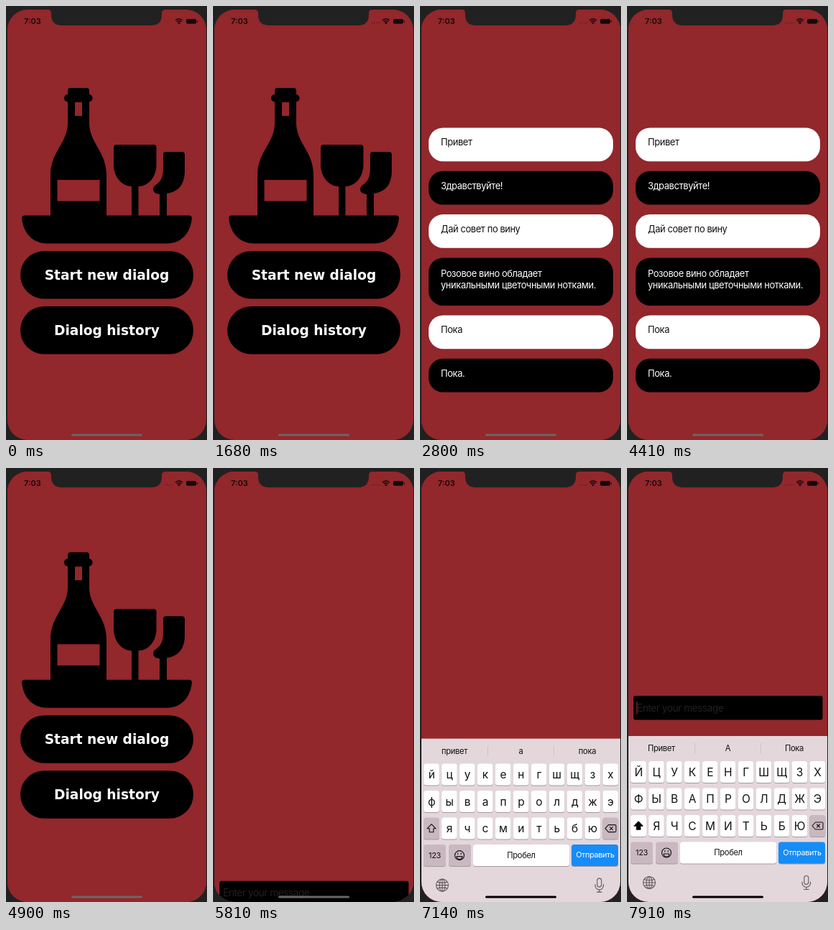
Recreate the animation shown at these times as an HTML page. Size 280 px wide and 604 px high, loop 8000 ms.

```html
<!DOCTYPE html>
<html lang="ru">
<head>
<meta charset="utf-8">
<style>
  html, body { margin: 0; width: 100%; height: 100%; overflow: hidden; background: #212122; }
  svg { display: block; width: 280px; height: 604px; }
  text { font-family: Inter, Roboto, sans-serif; letter-spacing: -.03em; }
  .button { font: bold 18.6px "DejaVu Sans", sans-serif; letter-spacing: 0; fill: #fff; }
  .mid { text-anchor: middle; }
  .red { fill: #92272c; }
  .icon { fill: none; stroke: #111; stroke-width: 1.1; stroke-linejoin: round; stroke-linecap: round; }
  .soft { stroke: #62575d; }
</style>
</head>
<body>
<svg viewBox="0 0 280 604">
  <defs>
    <clipPath id="screenShape"><rect x="2" y="5" width="277" height="599" rx="28"/></clipPath>
    <g id="home">
      <rect class="red" width="280" height="604"/>
      <rect x="86" y="114" width="30" height="20" rx="4"/>
      <rect x="81" y="123" width="39.5" height="10.5" rx="5"/>
      <path d="M86 130V163C86 190 62 203 62 235V293H140V235C140 203 116 190 116 163V130Z"/>
      <path class="red" d="M96 134h10v19h-10zM71.5 242h59v29.5h-59z"/>
      <path d="M154 193H206Q209.5 193 209.5 197V221C209.5 238 198 251 184.500 251V293H175V251C162 251 150 238 150 221V197Q150 193 154 193Z"/>
      <path d="M223 203H245Q249 203 249 207V230C249 248 240 259 224 261V293H214V262Q205 261 205 255Q205 251 210 248C217 243 219 236 219 224V207Q219 203 223 203Z"/>
      <path d="M26 291.5H255Q259 291.5 259 295C257 317 243 330.5 225 330.5H57C38 330.5 24 317 22 295Q22 291.5 26 291.5Z"/>
      <rect x="20" y="341" width="241" height="66.5" rx="33"/>
      <rect x="20" y="418" width="241" height="66.5" rx="33"/>
      <text class="button mid" x="140.5" y="381">Start new dialog</text>
      <text class="button mid" x="140.5" y="458">Dialog history</text>
    </g>
  </defs>
  <g clip-path="url(#screenShape)">
    <use href="#home"/>
    <g id="messageList"><rect class="red" width="280" height="604"/></g>
    <use id="homeAgain" href="#home"/>
    <g id="chat">
      <rect class="red" width="280" height="604"/>
      <g id="input">
        <rect x="9" y="548" width="263.5" height="33.5" rx="3"/>
        <text x="14" y="569.5" font-size="13.8" font-weight="300" fill="#2b2929">Enter your message</text>
        <rect id="caret" x="13" y="556" width="1.5" height="18" fill="#6b2024"/>
      </g>
    </g>
    <g id="keyboard">
      <rect y="373" width="280" height="240" fill="#e3d7dc"/>
      <path d="M94.5 383v15M186.5 383v15" stroke="#cfc2c8"/>
      <g id="keyCaps"></g>
      <path id="shiftArrow" class="icon" d="M16 492l6 6.2h-3.2v5h-5.6v-5h-3.2z"/>
      <path class="icon" d="M258 498l4.5-5h9q1.5 0 1.5 1.5v7q0 1.5-1.5 1.5h-9zM264.5 496l4 4m0-4l-4 4"/>
      <g class="icon">
        <circle cx="55" cy="535.5" r="6.5"/>
        <path d="M51 537h8q-.5 4-4 4t-4-4zM52.8 532.5v1.500M57.2 532.5v1.5"/>
      </g>
      <g class="icon soft">
        <circle cx="31" cy="577" r="8.5"/>
        <ellipse cx="31" cy="577" rx="4" ry="8.5"/>
        <path d="M22.5 577h17M31 568.5v17M24 572.5q7 2.5 14 0M24 581.5q7-2.5 14 0"/>
        <rect x="246.8" y="567.5" width="6" height="12" rx="3"/>
        <path d="M244 576v1.5a5.8 5.8 0 0 0 11.6 0V576M249.8 583.5v3M246.5 586.5h6.6"/>
      </g>
    </g>
    <g fill="#16080a">
      <text x="25" y="25.3" font-size="11" font-weight="600" style="letter-spacing:0">7:03</text>
      <rect x="251" y="18" width="14" height="6.8" rx="2"/>
      <rect x="265.8" y="20" width="1" height="3" rx=".5"/>
      <path d="M241 25.5l-2-2.2q2-1.6 4 0z"/>
      <path d="M236 20q5-4.2 10 0M237.7 22q3.3-2.6 6.6 0" fill="none" stroke="#16080a" stroke-width="1.4"/>
    </g>
    <path id="dots" d="M221 23.5h12" stroke="#6a1d21" stroke-width="1.6" stroke-dasharray="1.6 1.8"/>
    <rect id="homeBar" x="91" y="595.5" width="99" height="3" rx="1.5"/>
  </g>
  <path d="M57 4.5Q63 5 63 10V12Q63 27 78 27H202Q217 27 217 12V10Q217 5 223 4.5Z" fill="#212122"/>
</svg>
<script>
(() => {
  const LOOP = 8000, SCREEN = 604, KEYBOARD = 231;
  const $ = id => document.getElementById(id);

  function add(parent, tag, attrs, text = "") {
    const el = document.createElementNS("http://www.w3.org/2000/svg", tag);
    for (const name in attrs) el.setAttribute(name, attrs[name]);
    el.textContent = text;
    parent.append(el);
    return el;
  }

  // Message cards
  const messages = [
    ["Привет"], ["Здравствуйте!"], ["Дай совет по вину"],
    ["Розовое вино обладает", "уникальными цветочными нотками."],
    ["Пока"], ["Пока."]
  ];
  let cardY = 169.5;
  messages.forEach((lines, i) => {
    const tall = lines.length > 1, dark = i % 2, height = tall ? 66.5 : 46.7;
    add($("messageList"), "rect", { x: 12, y: cardY, width: 257, height, rx: 20, fill: dark ? "#000" : "#fff" });
    lines.forEach((line, n) => add($("messageList"), "text", {
      x: 29, y: cardY + (tall ? 27 : 24.7) + n * 15.6,
      "font-size": 12.9, fill: dark ? "#fff" : "#111"
    }, line));
    cardY += height + 13.6;
  });

  // Keyboard
  const keyCaps = $("keyCaps"), caseLabels = [];
  const PITCH = 24.93, GREY = "#cab8c1";
  let shiftKey, shifted;

  function label(x, y, size, text, fill = "#111") {
    return add(keyCaps, "text", { class: "mid", x, y: y + size * .36, "font-size": size, fill }, text);
  }
  function key(x, y, width, fill = "#fff") {
    add(keyCaps, "rect", { x, y: y + 1, width, height: 30, rx: 3.5, fill: "#a698a0" });
    return add(keyCaps, "rect", { x, y, width, height: 30, rx: 3.5, fill });
  }

  ["привет", "а", "пока"].forEach((word, i) =>
    caseLabels.push([label(48 + i * 92.5, 390, 11.2, word), word]));

  ["йцукенгшщзх", "фывапролджэ", " ячсмитьбю "].forEach((row, r) => {
    const y = 408 + r * 37.5;
    [...row].forEach((letter, c) => {
      const x = 16 + c * PITCH;
      if (letter === " ") {
        const special = key(x - 11, y, 22, GREY);
        if (c === 0) shiftKey = special;
      } else {
        key(x - 10.8, y, 21.6);
        caseLabels.push([label(x, y + 15, 15.5, letter), letter]);
      }
    });
  });

  key(5, 520.5, 31, GREY);
  key(40, 520.5, 31, GREY);
  key(74, 520.5, 134);
  key(211, 520.5, 65, "#168cf7");
  label(20.5, 535.5, 11, "123");
  label(141, 535, 11.2, "Пробел");
  label(244, 535, 10.8, "Отправить", "#fff");

  function setShift(on) {
    if (on === shifted) return;
    shifted = on;
    for (const [el, word] of caseLabels)
      el.textContent = on ? word[0].toUpperCase() + word.slice(1) : word;
    shiftKey.setAttribute("fill", on ? "#fff" : GREY);
    $("shiftArrow").style.fill = on ? "#000" : "none";
  }

  // Critically damped spring: remaining share of the travel
  function remaining(ms) {
    const wt = Math.max(0, ms) * .01826;
    return (1 + wt) * Math.exp(-wt);
  }
  function easeInOut(p) {
    p = Math.min(1, Math.max(0, p));
    return p * p * (3 - 2 * p);
  }
  const moveY = (id, y) => $(id).setAttribute("transform", `translate(0 ${y.toFixed(2)})`);
  const show = (id, on) => $(id).setAttribute("visibility", on ? "visible" : "hidden");

  function draw(t) {
    moveY("messageList", SCREEN * remaining(t - 2058));
    moveY("homeAgain", SCREEN * remaining(t - 4498));
    moveY("chat", SCREEN * remaining(t - 5543));
    moveY("keyboard", KEYBOARD * remaining(t - 6806));
    moveY("input", -KEYBOARD * easeInOut((t - 7400) / 450));
    show("keyboard", t > 6806);
    show("caret", t > 6806);
    show("dots", t >= 70);
    $("homeBar").setAttribute("fill", t > 6880 ? "#000" : "#6d6666");
    setShift(t >= 7700);
  }

  function frame() {
    draw(performance.now() % LOOP);
    requestAnimationFrame(frame);
  }
  frame();
})();
</script>
</body>
</html>
```
